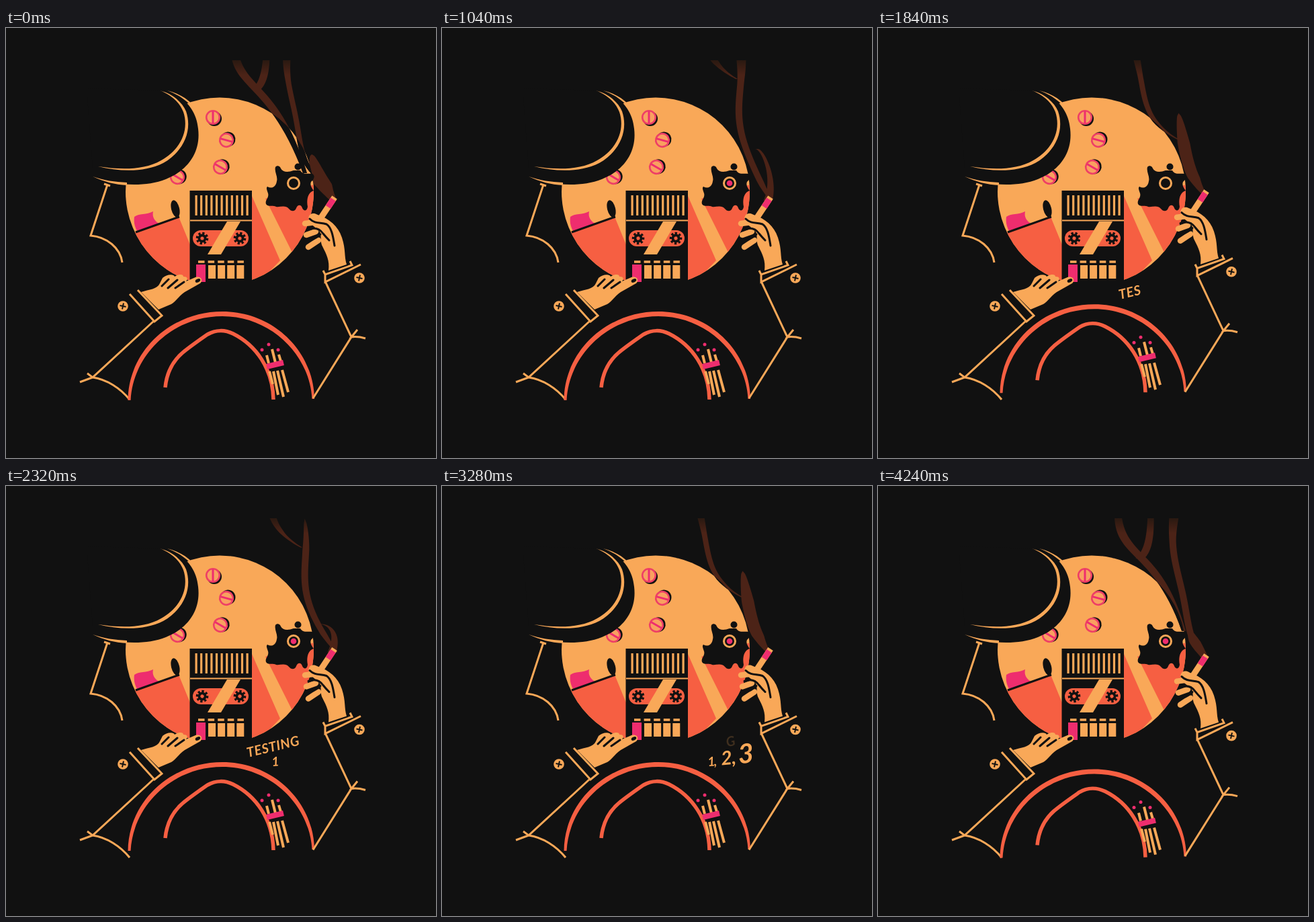
These frames come from a looping animation (640 px wide and 640 px high, 4320 ms). An HTML page:

```html
<!DOCTYPE html>
<html lang="en">
<head>
<meta charset="utf-8">
<title>Testing</title>
<style>
  html, body { margin: 0; height: 100%; overflow: hidden; background: #111; }
  svg { display: block; width: 100vw; height: 100vh; }
  text { font-family: Lato, "Open Sans", sans-serif; font-style: italic; font-weight: bold; }
  .o { fill: #f9a858; } .r { fill: #f65f42; } .p { fill: #ee2d6e; } .k { fill: #111; }
  .lo, .lk, .lr, .lp { fill: none; stroke-width: 3; }
  .lo { stroke: #f9a858; } .lk { stroke: #111; } .lr { stroke: #f65f42; } .lp { stroke: #ee2d6e; }
  .round { stroke-linecap: round; stroke-linejoin: round; }
</style>
</head>
<body>
<svg viewBox="0 0 640 640">
  <defs>
    <clipPath id="inDisc"><circle cx="318" cy="243.5" r="140"/></clipPath>
    <linearGradient id="fade" gradientUnits="userSpaceOnUse" x1="0" y1="48" x2="0" y2="70">
      <stop stop-color="#111"/><stop stop-color="#2a1911"/><stop offset="1" stop-color="#4c2317"/>
    </linearGradient>
    <g id="button">
      <circle class="o" r="7.8"/>
      <path class="lk" style="stroke-width:2" d="M-4.5-1 4.5 1M1-4.5-1 4.5"/>
    </g>
    <g id="pill">
      <circle class="k" cx="2" cy="2" r="11"/>
      <circle r="9.8" fill="#f9a060" stroke="#ee3f66" stroke-width="2.6"/>
      <path class="lp" d="M0-9V9"/>
    </g>
    <g id="gear">
      <circle class="k" r="6.5"/>
      <circle class="lk" r="7.6" style="stroke-width:3.4" stroke-dasharray="3.2 2.769"/>
      <circle class="r" r="2.6"/>
    </g>
  </defs>
  <rect class="k" width="640" height="640"/>

  <!-- disc and light beams -->
  <g clip-path="url(#inDisc)">
    <rect class="o" x="170" y="95" width="300" height="300"/>
    <path class="r" d="M180 308 257 281 275 325V390H180ZM366 250 408 346 366 390ZM386 254 462 232V310L427 336Z"/>
  </g>
  <use href="#pill" transform="translate(308 133)"/>
  <use href="#pill" transform="translate(328 167) rotate(-75)"/>
  <use href="#pill" transform="translate(319 207) rotate(-60)"/>
  <use href="#pill" transform="translate(255 222) rotate(-60)"/>

  <!-- rolled paper -->
  <path class="p" d="M191 281C197 276 210 278 219 273C217 282 222 288 228 291L195 302C191 295 190 287 191 281Z"/>
  <path class="lk" d="M193 304 258 281"/>
  <ellipse class="k" rx="6" ry="13" transform="translate(252 269) rotate(-14)"/>

  <!-- hat and collar -->
  <path class="k" d="M130 222C160 234 205 238 238 225C273 211 290 183 286 150C283 120 264 101 236 93L120 90Z"/>
  <path class="o" d="M129 221C146 227 162 229 180 230L180 234C162 233 146 229 129 221Z
    M240 93C256 97 268 104 277 113L273 113C264 105 254 98 240 93Z
    M137 206C170 211 205 212 231 197C260 181 273 152 264 125C258 110 245 99 229 93C248 98 262 110 268 124C278 153 264 184 234 201C206 215 170 214 137 206Z"/>
  <path class="lo" d="M146 232 155 235M151 233 126 309C150 311 170 327 173 349"/>

  <!-- recorder -->
  <path class="k" d="M273.500 242H366V392H273.500Z"/>
  <path class="lo" style="stroke-width:30" stroke-dasharray="3.2 4.4" d="M281.500 264H361"/>
  <path class="lo" style="stroke-width:2" d="M274 286.500H366"/>
  <rect class="r" x="278" y="301" width="83" height="24" rx="12"/>
  <path class="o" d="M329 288H349L320 337H300Z"/>
  <g id="reelL"><use href="#gear"/></g>
  <g id="reelR"><use href="#gear"/></g>
  <path class="lo" style="stroke-width:3.500" stroke-dasharray="9.500 5.100" d="M286 348H354"/>
  <path class="lo" style="stroke-width:20" stroke-dasharray="11 3.100" d="M301 363H354.500"/>
  <path class="p" d="M283 352H297V378H283Z"/>

  <!-- left arm -->
  <path class="o" d="M201 393C213 389 225 389 229 380L233 372C239 366 250 366 251 370C257 366 264 366 264 370C270 370 271 373 268 377L282 371C290 369 294 375 289 380L266 393C258 398 253 407 246 411L227 419Z"/>
  <path class="lk round" d="M232 384 242 374M241 387 255 375M252 387 265 378"/>
  <ellipse class="k" rx="4" ry="2.400" transform="translate(285.500 376) rotate(-25)"/>
  <path class="lo" d="M184 396 221 437 232 428 196 390M219 437 129 520C150 523 170 536 184 553M110 527 129 520 121 514"/>
  <use href="#button" x="174" y="414"/>

  <!-- smoke turns dark across the disc -->
  <path id="smoke" fill="url(#fade)"/>
  <path id="shade" class="k" clip-path="url(#inDisc)"/>

  <!-- splat with recording light -->
  <path class="k" d="M401 207C403 204 408 205 409 209C412 215 420 215 428 212H438C442 219 449 216 456 217C461 220 458 226 454 229C452 234 455 238 458 242C449 245 447 256 449 266C448 273 443 273 441 268C439 262 434 263 432 268C430 274 424 273 421 269C416 263 408 267 402 266C396 263 390 267 387 262C385 256 392 253 390 246C388 240 387 238 389 236C396 240 402 236 403 228C405 221 399 214 401 207Z"/>
  <circle class="k" cx="434.500" cy="206.500" r="5"/>
  <circle class="lo" cx="428" cy="231" r="8.500"/>
  <circle id="light" class="p" cx="428" cy="231" r="4.300"/>

  <!-- chest and pocket -->
  <g id="chest">
    <path class="r" d="M181.500 554C182 481 245 422 322 422C398 422 458 481 459 552L455.500 552C452 486 394 429 322 429C248 429 189 486 185.500 554Z"/>
    <path class="lr" style="stroke-width:5.500" d="M237 535C239 515 246 498 262 484C274 474 290 463 300 456C312 449 326 449 338 455C372 472 397 507 398 553"/>
    <path class="lo" style="stroke-width:4" d="M388 487 391 499M396 478 401 498M406 486 409 496M392 511 397 530M398 511 405 546M404 510 413 549M411 509 420 542"/>
    <path class="lp" style="stroke-width:8" d="M388 504 413 498"/>
    <g class="p"><circle cx="381" cy="479" r="2.500"/><circle cx="391" cy="471" r="2.500"/><circle cx="405" cy="479" r="2.500"/></g>
  </g>

  <!-- right arm -->
  <g id="arm">
    <path class="lo" style="stroke-width:9" d="M469 282 489 252"/>
    <path class="lp" style="stroke-width:9" d="M479.500 266.500 487 255"/>
    <path class="o" d="M480 361C482 346 477 337 471 325C466 315 472 306 464 300L453 291C446 280 454 272 464 278C481 284 494 294 500 312C506 330 503 340 507 352Z"/>
    <path class="lo round" style="stroke-width:8.500" d="M445 291 461 289M447 308 461 303M450 326 465 316"/>
    <path class="lk round" d="M452 284C460 292 468 289 477 292C485 297 487 312 489 324M450 300C460 296 467 299 472 306C476 311 478 313 481 316M453 316C459 314 464 311 468 307"/>
    <path class="lo" d="M472 361 475 367 515 353 512 347M475 367V378L528 352M475 377 514 460 457 551M523 449 514 460C521 459 528 460 535 462"/>
    <use href="#button" x="526" y="372"/>
  </g>

  <g id="words" class="o">
    <text id="word" transform="translate(360 404) rotate(-13.500)" font-size="20" letter-spacing=".5">TESTING</text>
    <text id="count" transform="rotate(-5 398 417)">1,2,3</text>
  </g>
</svg>
<script>
const LOOP = 4320, STEP = 80, PUFF = 160, CYCLE = 9;
const $ = id => document.getElementById(id);
const clamp = v => Math.min(1, Math.max(0, v));
const ease = v => (1 - Math.cos(Math.PI * clamp(v))) / 2;
const move = (id, x, y, turn = 0) =>
  $(id).setAttribute('transform', `translate(${x} ${y}) rotate(${turn})`);

// Each character gets its own span so that it can appear and fade alone.
function split(el) {
  const chars = [...el.textContent];
  el.textContent = '';
  return chars.map(c => {
    const span = document.createElementNS('http://www.w3.org/2000/svg', 'tspan');
    span.textContent = c;
    el.append(span);
    return span;
  });
}
const word = split($('word')), count = split($('count'));
count.forEach((el, i) => {
  const n = i >> 1, comma = i % 2;
  el.setAttribute('x', 396 + n * 17 + n * n * 3 + comma * (9 + 7 * n));
  el.setAttribute('y', 417);
  el.setAttribute('font-size', 19 + n * 8.5 + n * n);
});

function reveal(spans, t, on, off, lag, length) {
  spans.forEach((el, i) => {
    const alpha = t < on + 80 * i ? 0 : clamp(1 - (t - off - lag * i) / length);
    el.setAttribute('fill-opacity', alpha);
  });
}

// Outline of a strand; at(u) gives [x, y, width] for u from 0 to 1.
function ribbon(at, dy) {
  const sides = [[], []];
  for (let i = 0; i <= 30; i++) {
    const [x, y, w] = at(i / 30);
    sides[0].push([x - w / 2, y + dy]);
    sides[1].unshift([x + w / 2, y + dy]);
  }
  return `M${sides.flat().join('L')}Z`;
}

const bezier = (a, b, c, d, u) => [0, 1].map(n =>
  a[n] * (1 - u) ** 3 + 3 * b[n] * u * (1 - u) ** 2 + 3 * c[n] * u * u * (1 - u) + d[n] * u ** 3);

// A puff leaves the tip as a blob, stretches into a strand, then breaks off and drifts left.
function puff(age) {
  const loose = Math.max(0, age - 8);
  const top = Math.max(40, 188 - 26 * age);
  const bottom = loose ? 251 - 25 * loose : 257;
  const drift = Math.min(60, 20 * loose);
  const full = (loose ? 8 : 10) + 17 * clamp(1 - age / 4);
  return u => {
    const y = top + (bottom - top) * u;
    const x = 440 + 47 * Math.exp((y - 256) / 60)
      + 4 * clamp(age / 4) * Math.sin(y / 28 + age)
      - drift * (1 - Math.exp((y - bottom) / 35));
    const tip = top > 40 ? Math.sqrt(clamp((y - top) / 45)) : 1 + .5 * clamp((80 - y) / 40);
    const tail = .35 + .65 * clamp((bottom - y) / 25);
    return [x, y, full * tip * tail];
  };
}

// A forked wisp rises to the left of the strand.
function fork(s) {
  const shift = (x, y) => [x - 18 * s, y - 16 * s];
  const stem = [shift(357, 36), shift(357, 110), shift(415, 90), [455 - 10 * s, 216]];
  const prong = [shift(406, 36), shift(406, 70), shift(404, 95), shift(390, 108)];
  return [
    u => [...bezier(...stem, u), 10 + 7 * Math.sin(Math.PI * u) - 4 * u],
    u => [...bezier(...prong, u), 9 + 4 * u]
  ];
}

// A side arm closes a loop above the tip.
const arm = top => u => [...bezier([468, top], [478, top], [497, 225], [485, 257], u), 4 + 9 * u * u];

function smoke(slot, dy) {
  const strands = [slot, slot + CYCLE].map(puff);
  if (slot === CYCLE - 1) strands.push(puff(-1));
  const rise = (slot + 2) % CYCLE - 1;
  if (rise < 2) strands.push(...fork(rise));
  if (slot > 4 && slot < 7) strands.push(arm(390 - 35 * slot));
  return strands.map(s => ribbon(s, dy)).join('');
}

function draw(now) {
  const t = Math.floor(now % LOOP / STEP) * STEP;
  const lift = ease((t - 1260) / 640) - ease((t - 3680) / 640);
  move('chest', 0, -11 * lift);
  move('arm', 0, -9.5 * lift);

  const d = smoke(Math.floor(t / PUFF) % CYCLE, -9.5 * lift);
  $('smoke').setAttribute('d', d);
  $('shade').setAttribute('d', d);

  const blink = t * 7 / LOOP % 1;
  $('light').setAttribute('opacity', +(blink > .25 && blink < .92));
  move('reelL', 292, 313, t / 4);
  move('reelR', 348, 313, t / 4);

  reveal(word, t, 1680, 2880, 40, 200);
  reveal(count, t, 2320, 3600, 20, 240);
}

const start = performance.now();
function tick() {
  draw(performance.now() - start);
  requestAnimationFrame(tick);
}
tick();
</script>
</body>
</html>
```
